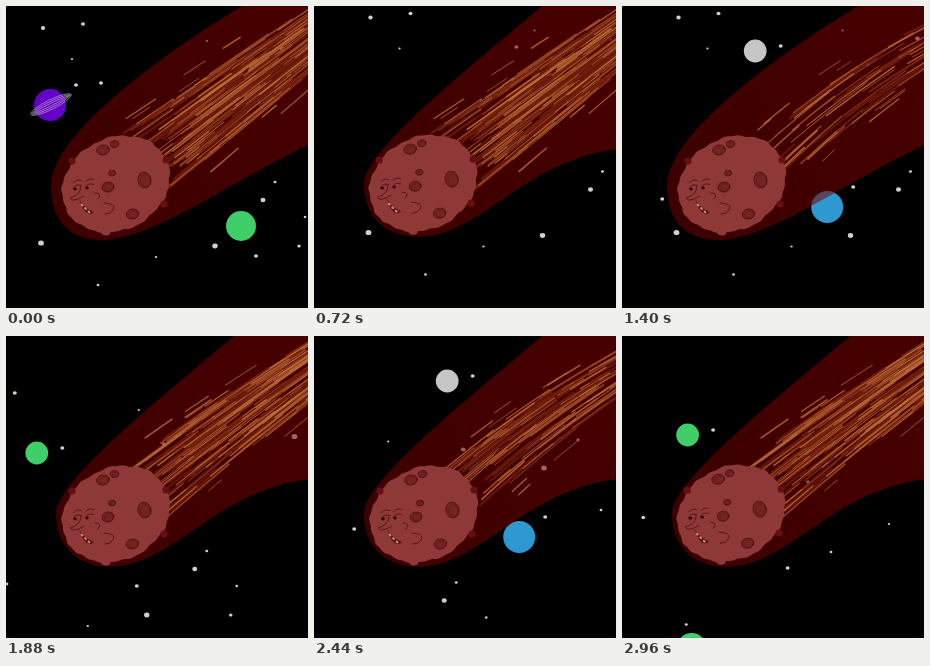
An HTML page with a canvas that plays this animation: 302x302 px, repeating every 3 s.

```html
<!DOCTYPE html>
<html lang="en">
<head>
<meta charset="utf-8">
<title>Meteor</title>
<style>
html, body { margin: 0; width: 100%; height: 100%; overflow: hidden; background: #000; }
canvas { display: block; width: 302px; height: 302px; }
</style>
</head>
<body>
<canvas id="stage" width="302" height="302"></canvas>
<script>
const ctx = document.getElementById('stage').getContext('2d');
const STEP = 40, COUNT = 75, TAU = Math.PI * 2;

// Two parallax layers; each jumps back when its cycle ends.
const far = { cycle: 17, step: [19.5, -10.5], tile: [321.75, -175.5] };
const near = { cycle: 26, step: [34.8, -18], tile: [931, -488] };

// Far stars, largest first.
const farStars = [
  [35, 237], [209, 240], [257, 194], [276, 43], [37, 22], [77, 18], [226, 69], [293, 240],
  [69, 209], [269, 176], [92, 279], [299, 211], [150, 251], [66, 53], [201, 35]
].map(([x, y], i) => ({ x, y, r: 2.9 * 0.93 ** i }));

const planet = (x, y, r, colour, ring) => ({ x, y, r, colour, ring });
const planets = [
  planet(44, 99, 16, '#6400c8', true),
  planet(235, 220, 15, '#40ce69'),
  planet(-108, 363, 16, '#2e98d0'),
  planet(-180, 207, 11.4, '#c6c6c6'),
  planet(-285, 508, 15, '#c0363e'),
  planet(-700, 495, 11.4, '#40ce69')
];

// Every planet has a companion star, set by its size.
const companion = { 16: [26, -20], 15: [15, 30], 11.4: [25.5, -5] };
const nearStars = planets
  .map(p => [p.x + companion[p.r][0], p.y + companion[p.r][1]])
  .concat([[95, 77], [-273, 355], [-424, 365], [-600, 628]])
  .map(([x, y]) => ({ x, y, r: 2 }));

function random(seed) {
  return () => {
    seed = (seed * 1664525 + 1013904223) >>> 0;
    return seed / 4294967296;
  };
}

// Streaks run along u (away from the rock), v is across; the bundle thins out per drawing.
function bundle(d) {
  const rnd = random(7 + 16 * d), count = 270 - 52 * d, half = 33 - 2 * d;
  return Array.from({ length: count }, (_, i) => {
    const stray = i > count - 9;
    const side = rnd() < 0.6 ? -1 : 1;
    return {
      u: stray ? rnd() * 140 : -15 + rnd() * 200,
      v: half * (stray ? side * (1.05 + 0.4 * rnd()) : rnd() * 2 - 1),
      len: stray ? 15 + rnd() * 25 : 30 + rnd() * 70,
      bow: 1.5 * d,
      width: 0.7 + rnd() * 0.9,
      tone: stray ? 1 : i % 3
    };
  });
}
const bundles = [0, 1, 2, 3, 4].map(bundle);
const tones = ['#6a1a0b', '#bd6a35', '#a5522a'];

function oval(x, y, rx, ry = rx, turn = 0) {
  ctx.beginPath();
  ctx.ellipse(x, y, rx, ry, turn, 0, TAU);
}

function dot(colour, ...shape) {
  ctx.fillStyle = colour;
  oval(...shape);
  ctx.fill();
}

function drift(items, { cycle, step, tile }, n, draw) {
  const phase = n % cycle;
  for (const item of items) {
    for (const k of [0, 1]) {
      draw(item.x + phase * step[0] - k * tile[0], item.y + phase * step[1] - k * tile[1], item);
    }
  }
}

function drawStar(x, y, { r }) {
  dot('#d0d0d0', x, y, r, r * 0.9);
}

function drawPlanet(x, y, { r, colour, ring }) {
  dot(colour, x, y, r);
  if (!ring) return;
  ctx.strokeStyle = '#b9a9cc';
  ctx.lineWidth = 0.7;
  for (let i = 0; i < 3; i++) {
    oval(x + 1, y - 0.5, 22.5 - 1.5 * i, 4.8 - 1.8 * i, -0.46);
    ctx.stroke();
  }
}

// head tightens the rounded front, waist pinches the lower edge.
function tail(head, waist) {
  const left = 45 + 5 * head, mid = 180 - 2 * head;
  const lowX = 95 + 10 * head, lowY = 234 - 3 * head;
  const top = 236 + 14 * head - 22 * waist;
  ctx.beginPath();
  ctx.moveTo(top, 0);
  ctx.bezierCurveTo(150, 52 + 14 * head, left, 130 + 15 * head, left, mid);
  ctx.bezierCurveTo(left, mid + 34, lowX - 32, lowY, lowX, lowY);
  ctx.bezierCurveTo(lowX + 52 + 12 * waist, lowY - 2 * waist,
    225 - 17 * waist, 175 - 20 * waist, 304, 138 + 5 * waist);
  ctx.lineTo(304, 0);
  ctx.closePath();
  const g = ctx.createLinearGradient(60, 210, 300, 40);
  g.addColorStop(0, 'rgba(112,0,0,0.54)');
  g.addColorStop(1, 'rgba(130,0,0,0.54)');
  ctx.fillStyle = g;
  ctx.fill();
}

function drawStreaks(list) {
  ctx.globalAlpha = 0.85;
  ctx.lineCap = 'round';
  for (const s of list) {
    const place = u => {
      const v = s.v * (1.1 - u / 700) + s.bow * ((u - 95) / 95) ** 2;
      return [147 + u * 0.8 + v * 0.6, 150 - u * 0.6 + v * 0.8];
    };
    ctx.strokeStyle = tones[s.tone];
    ctx.lineWidth = s.tone ? s.width : s.width + 1;
    ctx.beginPath();
    ctx.moveTo(...place(s.u));
    ctx.quadraticCurveTo(...place(s.u + s.len / 2), ...place(s.u + s.len));
    ctx.stroke();
  }
  ctx.globalAlpha = 1;
}

function rock() {
  ctx.save();
  ctx.translate(110, 178);
  ctx.rotate(-0.49);
  ctx.beginPath();
  for (let a = 0; a < TAU; a += 0.05) {
    const rough = 0.6 * Math.sin(9 * a) + 0.5 * Math.sin(23 * a);
    ctx.lineTo((56 + rough) * Math.cos(a), (46 + rough) * Math.sin(a));
  }
  ctx.fillStyle = '#8e3937';
  ctx.fill();
  ctx.restore();
  dot('#8e3937', 100, 226, 4.5, 3.5);
  for (const [x, y] of [[66, 155], [160, 154], [158, 198]]) dot('#650f10', x, y, 3.6);
}

function crater(x, y, rx, ry) {
  dot('#732421', x, y, rx, ry, -0.2);
  ctx.strokeStyle = '#501012';
  ctx.lineWidth = 0.9;
  ctx.stroke();
  ctx.globalAlpha = 0.4;
  oval(x + 1, y + 0.6, rx * 0.75, ry * 0.75, -0.2);
  ctx.stroke();
  ctx.globalAlpha = 1;
}

function face() {
  ctx.strokeStyle = '#5a1417';
  ctx.lineWidth = 1;
  for (const x of [69, 81]) {
    const y = 183 - (x - 69) / 12;
    dot('#2d0507', x, y, 1.7, 1.4);
    for (const lift of [2, 7]) {
      ctx.beginPath();
      ctx.arc(x + 4, y - lift + 5, 7, -2.5, -1.2);
      ctx.stroke();
    }
  }
  ctx.stroke(new Path2D('M75 180Q75 189 64 192Q67 197 78 190M89 187Q97 187 92 193M98 197Q114 198 104 207L99 208'));
  ctx.fillStyle = '#5a1417';
  ctx.fill(new Path2D('M73 193Q78 202 88 206Q80 214 73 193'));
  for (let i = 0; i < 3; i++) dot('#c58a82', 76 + 3.5 * i, 199 + 3.5 * i, 1.6, 1.1, 0.7);
}

function meteor() {
  rock();
  crater(97, 144, 6.5, 5);
  crater(108.5, 138, 4.2, 3.4);
  crater(106, 167, 3.6, 2.8);
  crater(102, 181, 6, 5);
  crater(138.5, 174, 6.6, 8);
  crater(126.5, 208, 6.3, 5);
  face();
}

function render(n) {
  ctx.fillStyle = '#000';
  ctx.fillRect(0, 0, 302, 302);
  drift(farStars, far, n, drawStar);
  drift(nearStars, near, n, drawStar);
  drift(planets, near, n, drawPlanet);

  const flap = n % 7, head = Math.min(1, Math.floor(flap / 2) / 2);
  tail(head, flap === 6 ? 0 : head);
  drawStreaks(bundles[Math.floor(n % 9 / 2)]);

  const bob = Math.abs(n % 14 - 3) < 2 ? -0.8 : 0;
  ctx.save();
  ctx.translate(bob, bob);
  meteor();
  ctx.restore();
}

const start = performance.now();
function tick() {
  render(Math.floor(Math.max(0, performance.now() - start) / STEP) % COUNT);
  requestAnimationFrame(tick);
}
tick();
</script>
</body>
</html>
```
